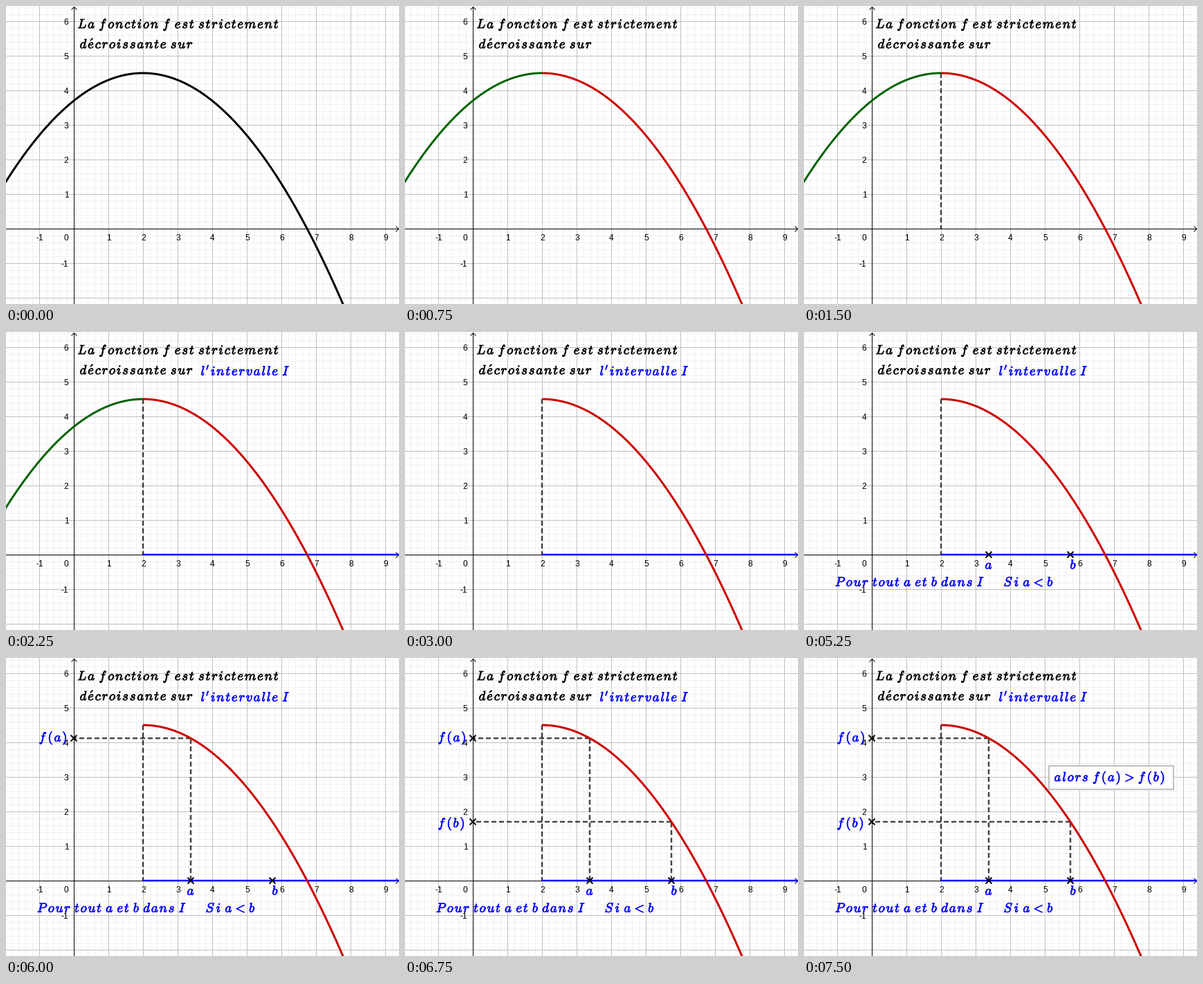
A matplotlib script that plays this animation: 568 by 431 pixels, repeating every 9.75 s.

```python
import numpy as np
import matplotlib.pyplot as plt
from matplotlib.animation import FuncAnimation
from matplotlib.patches import PathPatch, Rectangle
from matplotlib.textpath import TextPath
from matplotlib.transforms import Affine2D

W, H, DPI = 568, 431, 64
PX = 72 / DPI                      # one pixel in points
STEPS, STEP_MS = 13, 750
OX, OY, UNIT = 98, 322, 50         # axis origin and unit length in pixels
BLUE, GREEN, RED = "#0000ff", "#006400", "#cc0000"
A, B = 3.38, 5.74

plt.rcParams["mathtext.fontset"] = "cm"
plt.rcParams["font.family"] = "Liberation Sans"

fig = plt.figure(figsize=(W / DPI, H / DPI), dpi=DPI, facecolor="white")
ax = fig.add_axes([0, 0, 1, 1])
ax.set_xlim(-0.5, W - 0.5)         # whole numbers are pixel centres
ax.set_ylim(H - 0.5, -0.5)
ax.axis("off")

timeline = []                      # (artist, first step, end step)


def show(artist, start=0, end=STEPS):
    timeline.append((artist, start, end))


def px(x, y):
    return OX - 0.5 + UNIT * x, OY - 0.5 - UNIT * y


def f(x):
    return 4.5 - 0.2 * (x - 2) ** 2


def line(xs, ys, color="black", width=1, z=2, **kw):
    return ax.plot(xs, ys, color=color, lw=width * PX, zorder=z, snap=False,
                   solid_capstyle="butt", **kw)[0]


def grid():
    for step, color, z in ((10, "#f0f0f0", 0), (UNIT, "#c0c0c0", 1)):
        for x in range(OX % step, W, step):
            line([x, x], [-1, H], color, z=z)
        for y in range(OY % step, H, step):
            line([-1, W], [y, y], color, z=z)


def axes():
    line([-1, W], [OY, OY])
    line([OX, OX], [1, H])
    line([OX - 4, OX, OX + 4], [5, 1, 5])
    line([W - 5, W - 1, W - 5], [OY - 4, OY, OY + 4])
    font = dict(fontsize=12 * PX, va="baseline", zorder=3)
    for n in range(-1, 10):
        x = 86.5 if n == 0 else OX + UNIT * n
        ax.text(x, 338, str(n), ha="center", **font)
    for n in (-1, 1, 2, 3, 4, 5, 6):
        ax.text(90, OY - UNIT * n + 4, str(n), ha="right", **font)


def tex(text):
    """Letter-spaced math italic, with italic correction after slanted letters."""
    gap = r"\hspace{0.11}"
    words = (gap.join(word) for word in text.split())
    body = r"\hspace{0.38}".join(words).replace(gap + "'", "'")
    for letter in "fPS":
        body = body.replace(letter + gap, letter + r"\hspace{0.22}")
        body = body.replace(letter + r"\hspace{0.38}", letter + r"\hspace{0.49}")
    return "$" + body.replace("é", r"\acute{e}") + "$"


def label(x, y, text, start, color=BLUE):
    path = TextPath((0, 0), tex(text), size=18.8)
    place = Affine2D().scale(1, -1).translate(x, y) + ax.transData
    show(ax.add_patch(PathPatch(path, fc=color, ec=color, lw=0.8 * PX,
                                transform=place, zorder=8)), start)


def curve(x0, x1, color, start, end=STEPS):
    x = np.linspace(x0, x1, 300)
    show(line(*px(x, f(x)), color, 3, z=5), start, end)


def dashed(points, start):
    xs, ys = zip(*(px(*p) for p in points))
    show(line(xs, ys, "black", 2.5, z=4, alpha=0.72, dashes=(2.8, 1.6),
              dash_capstyle="butt"), start)


def cross(x, y, start):
    cx, cy = px(x, y)
    for s in (-1, 1):
        show(line([cx - 4.5, cx + 4.5], [cy - 4.5 * s, cy + 4.5 * s],
                  width=2, z=7), start)


grid()
axes()

label(103, 31.5, "La fonction f est strictement", 0, "black")
label(106, 60.5, "décroissante sur", 0, "black")
curve(-2.1, 8, "black", 0, 1)
curve(-2.1, 2, GREEN, 1, 4)
curve(2, 8, RED, 1)

dashed([(2, f(2)), (2, 0)], 2)
show(line(*zip(px(2, 0), px(10, 0)), BLUE, 2.5, z=4), 3)
label(281, 62, "l'intervalle I", 3)

label(44.5, 367, "Pour tout a et b dans I", 5)
for x, name, lx in ((A, "a", 261), (B, "b", 384)):
    cross(x, 0, 6)
    label(lx, 342, name, 6)
label(288, 367, "Si a<b", 7)

for x, name, ly, start in ((A, "f(a)", 120, 8), (B, "f(b)", 244, 9)):
    dashed([(x, 0), (x, f(x))], start)
    dashed([(x, f(x)), (0, f(x))], start)
    cross(0, f(x), start)
    label(47, ly, name, start)

show(ax.add_patch(Rectangle((353.5, 155.5), 180, 34, fc="white", ec="#c0c0c0",
                            lw=2 * PX, zorder=7, snap=False)), 10)
label(361, 177.5, "alors f(a)>f(b)", 10)


def draw(step):
    for artist, start, end in timeline:
        artist.set_visible(start <= step < end)
    return [item[0] for item in timeline]


anim = FuncAnimation(fig, draw, frames=STEPS, interval=STEP_MS,
                     init_func=lambda: draw(0), repeat=True, repeat_delay=0)
plt.show()
```
